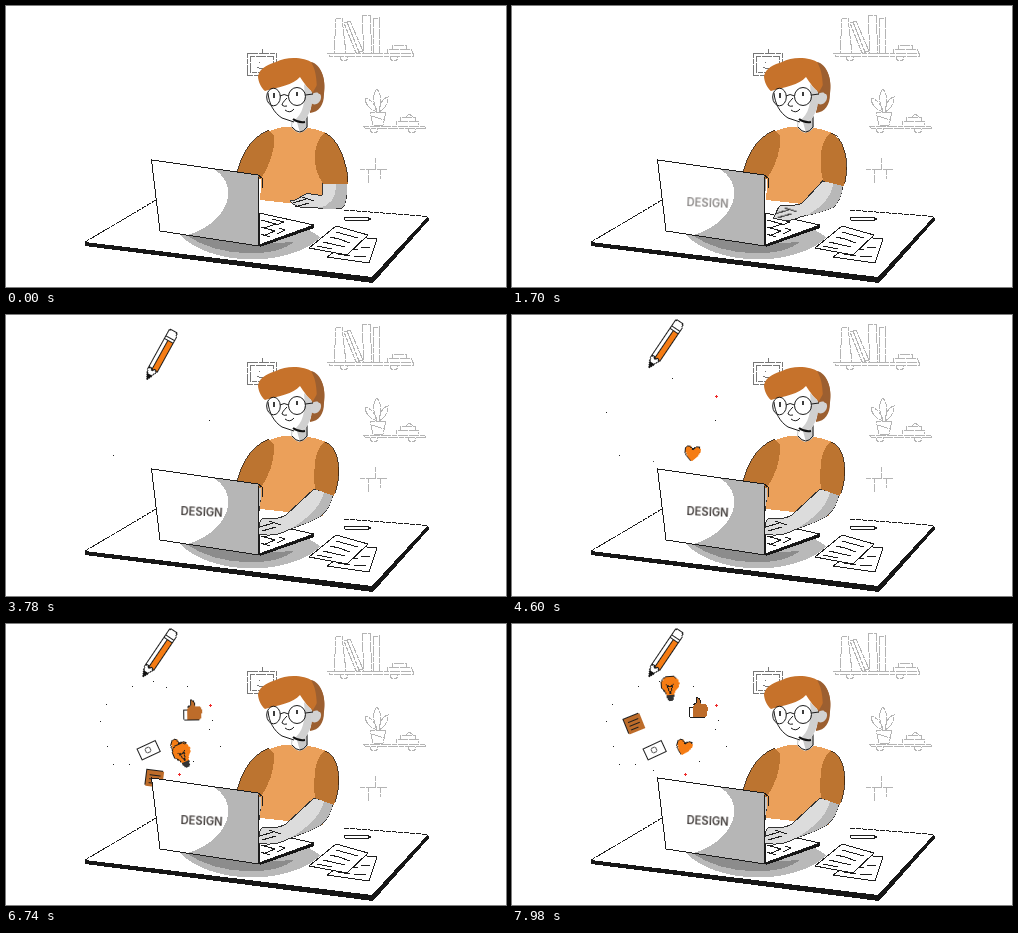
An HTML page for the animation above (8000 ms loop, 500 px wide and 281 px high).

```html
<!DOCTYPE html>
<html lang="en">
<head>
<meta charset="utf-8">
<title>Designer at work</title>
<style>
  html, body { margin: 0; width: 100%; height: 100%; overflow: hidden; background: #fff; }
  svg { display: block; width: 100vw; height: 100vh; shape-rendering: crispEdges; }
  .line { fill: none; stroke: #1c1c1c; }
  .paper { fill: #fff; stroke: #1c1c1c; }
  .faint { fill: none; stroke: #b4b4b4; stroke-dasharray: 5 .6; }
  .shirt { fill: #eba05a; }
  /* The dash draws only the outer edge of a sleeve. */
  .sleeve { fill: #bc7430; stroke: #2a1a0c; stroke-width: .8; stroke-dasharray: 56 300; }
  .hair { fill: #c6722b; }
  .orange { fill: #f57c14; }
  .brown { fill: #bd6c2a; }
  .smooth { shape-rendering: auto; }
  .label { font: 600 11.2px Inter, "Open Sans", sans-serif; fill: #46413f; }
</style>
</head>
<body>
<svg viewBox="0 0 500 281" preserveAspectRatio="none">
  <!-- wall -->
  <g class="faint">
    <path d="M322 47.500H407V50.500H324ZM334 51a4 4 0 0 0 8 0M384 51a4 4 0 0 0 8 0"/>
    <path d="M330 13L336 12L340 47H328ZM338 17L344 15L357 45L350 47ZM341 16L353 46M356 10L364 9L366 47H358ZM367 13L373 12V47H367Z"/>
    <path d="M381 47V43H405L407 47M386 43V39H400V43"/>
    <path d="M358 120.500H419V122.500H360ZM364 123a4 4 0 0 0 8 0M402 123a4 4 0 0 0 8 0"/>
    <path d="M364 106H380L377 119H367ZM371 106C363 103 358 97 360 92C366 95 370 99 371 106C366 94 367 87 371 83C376 89 375 98 373 106C374 97 377 92 382 91C382 99 378 103 373 106M366 110L378 114"/>
    <path d="M390 119V115H412V119M394 115V111H409V115M400 111L403 108L407 111"/>
    <path d="M354 163.500H382M369.500 152V163M362.500 163V177M374.500 164V173"/>
    <path stroke="#777" d="M241.500 47.500H270V69H241.500ZM244 50H267.500V66H244ZM256.500 43V47M251 61q5 4 10 0M253 56v1"/>
  </g>

  <!-- desk -->
  <path d="M79 236L366 271L422 210L423 214L367 277L79 240Z" fill="#171717"/>
  <path d="M79 236L150 194L422 210.500L366 270.500Z" fill="#fff"/>
  <path class="line" stroke-dasharray="5 1" d="M79 236L150 194M338 204L422 210.500"/>
  <path d="M172 227C188 245 222 256 258 253C286 250 306 241 314 231L300 222L253 240Z" fill="#b9b9b9"/>
  <path d="M180 229C198 241 222 249 254 247C268 246 279 243 288 236L253 238Z" fill="#8c8c8c"/>
  <path class="paper" d="M350 231L371 233L363 257L321 251Z"/>
  <path class="line" d="M344 243l8 1M355 241l9 1M332 248l12 2M348 250l12 1"/>
  <path class="paper" d="M330 220L362 229L341 249L303 242Z"/>
  <path class="line" d="M330 226l22 6M324 231l9 2l11 4M317 236l22 5M311 240l15 3"/>
  <path class="paper" d="M339 211L360 211L365 213L360 215L339 214Q337 212 339 211Z"/>

  <!-- person -->
  <path id="farArm" fill="#c4c4c4" stroke="#333" d="M246 168L255 170L256 180L253 196L246 196Z"/>
  <path class="shirt" d="M262 126Q274 120 285 121Q293 130 302 122Q315 124 322 128L327 160L317 201L254 194L256 165Z"/>
  <path class="sleeve" d="M263 124C246 131 236 146 231 167L255 173C264 158 269 145 268 130Z"/>
  <g class="smooth">
    <path d="M286 108L285 121Q294 132 302 121L301 104Z" fill="#c9c9c9"/>
    <path d="M287 113L286 121Q289 126 294 127L291 116Z" fill="#fff"/>
    <path class="line" d="M301 108V121Q294 131 286 121"/>
    <path d="M305 58C316 60 320 73 318 88C318 99 313 106 304 107L300 84Z" fill="#9c5f30"/>
    <path d="M262 81C262 95 267 107 276 112C283 116 292 118 299 113C305 108 307 98 305 84L294 68Z" fill="#fff"/>
    <path d="M298 78L306 86C307 99 304 108 299 113Q294 117 287 115C297 109 300 96 298 78Z" fill="#d0d0d0"/>
    <path class="line" d="M262 87C263 98 268 107 276 112L288 116"/>
    <path d="M287 113Q292 117 299 116" fill="none" stroke="#111" stroke-width="2"/>
    <path d="M305 90C308 84 316 86 315 92C314 98 308 100 305 97Z" fill="#d2d2d2"/>
    <path class="hair" d="M259 85C255 82 252 75 252 70C254 61 264 58 270 56C281 50 298 51 307 57C313 61 313 70 311 79L307 86C302 83 298 77 294 71C287 79 273 81 259 85Z"/>
    <path d="M305 56C315 58 320 73 318 87L313 88C309 83 313 69 305 56Z" fill="#9c5f30"/>
    <g class="line">
      <ellipse cx="267.500" cy="91" rx="6.800" ry="8.800"/>
      <ellipse cx="291" cy="90.500" rx="8.500" ry="9"/>
      <path d="M274 90Q278 87 282.500 90M299.500 89L307 88M281 92Q276 97 276 99Q278 101 281 100M279 104Q284 108 288 103"/>
      <path stroke-width="1.700" d="M268 87V92M291 86V90"/>
    </g>
  </g>

  <!-- laptop base -->
  <path d="M253 239L308 219V222L254 241Z" fill="#151515"/>
  <path class="paper" d="M253 207L308 219L253 239Z"/>
  <path class="line" d="M255 214L270 218L258 222M255 221L269 225L257 230M255 228L264 231M266 213L278 216L270 219M273 222L279 224L271 228"/>

  <path id="forearm" fill="#dcdcdc" stroke="#333"/>
  <path id="armShade" fill="#b8b8b8"/>
  <path id="fingers" class="line" d="M254 212L267 208M256 216L270 212M263 206L275 210"/>
  <path id="sleeve" class="sleeve"/>

  <g id="dots"></g>

  <!-- items that fly out of the screen -->
  <g id="heart">
    <path class="orange" d="M0 9C-5 4 -8 0 -7 -4C-5 -9 0 -7 1 -3C3 -8 8 -8 8 -4C9 0 4 4 0 9Z"/>
    <path class="line" d="M-1 8C-6 4 -9 -1 -7 -5C-5 -8 -1 -6 0 -3C2 -7 6 -8 7 -5"/>
  </g>
  <g id="letter">
    <path class="paper" d="M-10 -6H10V6H-10Z"/>
    <circle class="line" r="3" stroke-width=".7"/>
  </g>
  <g id="thumb">
    <path class="paper" d="M-9 -2H-4V8H-8Z"/>
    <path class="brown" d="M-5 -3L-1 -6V-11Q3 -11 3 -5H8Q11 -1 9 3Q10 6 7 8Q1 10 -5 8Z"/>
    <path class="line" d="M-5 -4L-2 -6V-11Q2 -12 3 -6M-5 8Q1 10 7 8"/>
  </g>
  <g id="note">
    <path class="brown" d="M-8 -8H9V8H-8Z"/>
    <path class="line" d="M8 -9H-9V7M-5 -4H6M-5 0H6M-5 4H3"/>
  </g>
  <g id="bulb">
    <path class="orange" d="M-4 7Q-4 4 -7 1C-11 -5 -6 -12 1 -12C9 -12 12 -5 8 1Q4 4 4 7Z"/>
    <path class="line" d="M-4 6Q-5 3 -8 0C-11 -6 -6 -12 0 -12Q5 -12 7 -9M0 6L-3 -3L0 -1L3 -3L0 6"/>
    <path d="M-4 7H4L3 12Q0 15 -3 12Z" fill="#333"/>
  </g>
  <g id="pencil">
    <path class="paper" d="M-5 -24Q-5 -28 0 -28Q5 -28 5 -24V17L0 28L-5 17Z"/>
    <path class="orange" d="M-1 -17H5V17L2 15L-1 18Z"/>
    <path class="line" d="M-5 -20H5M-5 -17H5M-1 -17V17M-5 17L-2 15L0 18L2 15L5 17"/>
    <path d="M-2.500 22L0 28.500L2.500 22Z" fill="#111"/>
  </g>

  <!-- laptop lid -->
  <path class="line" d="M252 169L256 172V182"/>
  <path d="M145 154L252 169L253 240L154 225Z" fill="#fff"/>
  <path d="M207 162.500L252 169L253 240L182 229C204 222 219 208 222 191C224 179 218 169 207 162.500Z" fill="#b6b6b6"/>
  <path class="line" d="M145.500 154L252 169L253 240L154 225Z"/>
  <text id="word" class="label" x="174.500" y="200" transform="rotate(2.500 175 200)">DESIGN</text>
</svg>
<script>
const LOOP = 8000, FLIGHT = 1750;
const SCREEN_Y = 190;                               // items start hidden behind the lid
const EASE_OUT = 'cubic-bezier(.33, .67, .67, 1)';  // quadratic
const byId = id => document.getElementById(id);

// Go from one state to another between two times and hold both ends.
function tween(el, start, end, from, to, easing = 'linear') {
  el.animate([
    { offset: 0, ...from },
    { offset: start / LOOP, ...from, easing },
    { offset: Math.min(end / LOOP, 1), ...to },
    { offset: 1, ...to }
  ], { duration: LOOP, iterations: Infinity });
}

const pose = (x, y, angle = 0) => ({ transform: `translate(${x}px, ${y}px) rotate(${angle}deg)` });
const shape = d => ({ d: `path("${d}")` });
const reach = (id, from, to) => tween(byId(id), 0, 2400, from, to);
const appear = (el, start) => tween(el, start, start + 100, { opacity: 0 }, { opacity: 1 });

reach('farArm', pose(-9, 0), pose(0, 0));
reach('fingers', pose(33, -15), pose(0, 0));
reach('sleeve',
  shape('M319 127C331 132 342 155 342 178L317 178C312 170 307 158 309 147C310 138 313 131 319 127Z'),
  shape('M319 127C333 132 337 158 328 181L309 174C308 168 308 158 309 147C310 138 313 131 319 127Z'));
reach('forearm',
  shape('M317 177L341 177C341 190 340 200 336 202C325 204 312 202 303 201C296 203 288 200 284 195C292 195 294 190 300 188C306 187 312 190 316 189Z'),
  shape('M308 174L327 179C325 189 321 196 315 201C305 207 290 212 282 215C272 221 262 221 252 219C254 212 252 207 256 204C262 203 270 206 280 200Z'));
reach('armShade',
  shape('M330 177L341 177C341 190 340 200 336 202C328 203 320 203 312 202C324 200 331 192 330 177Z'),
  shape('M318 177L327 179C325 189 321 196 315 201C305 207 295 210 286 213C300 204 314 194 318 177Z'));

appear(byId('word'), 1640);

// Every item rises, slows down and turns the same way.
function fly(id, start, fromX, x, y, fromAngle, angle) {
  tween(byId(id), start, start + FLIGHT, pose(fromX, SCREEN_Y, fromAngle), pose(x, y, angle), EASE_OUT);
}
fly('pencil', 2480, 181, 152.5, 29.5, -44, 34);
fly('heart', 3680, 210, 172, 123, -30, 16);
fly('letter', 4450, 223, 142, 126, 10, -25);
fly('thumb', 5260, 195, 186, 85, -30, 0);
fly('bulb', 6280, 193, 158, 64, -41, -4);
fly('note', 6390, 165, 122, 100, 26, -22);

// Confetti: a loose ring around the items, filling up over time.
let seed = 7;
const random = () => (seed = seed * 16807 % 2147483647) / 2147483647;

for (let i = 0; i < 16; i++) {
  const angle = i * 2.4, spread = .75 + .3 * random(), red = i % 6 === 5;
  const dot = document.createElementNS('http://www.w3.org/2000/svg', 'circle');
  const attrs = {
    cx: Math.round(155 + 64 * spread * Math.cos(angle)) + .5,
    cy: Math.round(105 + 50 * spread * Math.sin(angle)) + .5,
    r: red ? 1.2 : .7,
    fill: red ? '#ee2a2a' : '#222'
  };
  for (const name in attrs) dot.setAttribute(name, attrs[name]);
  byId('dots').append(dot);
  appear(dot, 3500 + i * 170);
}
</script>
</body>
</html>
```
